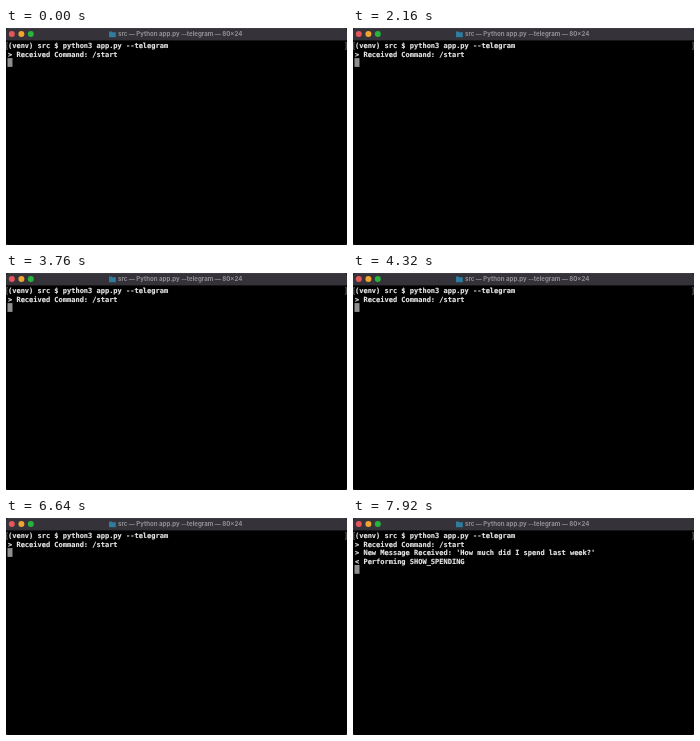
An HTML page that plays this animation: 341x217 px, repeating every 8000 ms.

```html
<!DOCTYPE html>
<html lang="en">
<head>
<meta charset="utf-8">
<title>Terminal</title>
<style>
  html, body { margin: 0; width: 100%; height: 100%; overflow: hidden; background: #2b2b2b; }
  svg { display: block; width: 100vw; height: 100vh; }
  .title { font: 700 6.1px Inter, sans-serif; fill: #929095; }
  .shell { font: bold 7px "DejaVu Sans Mono", monospace; fill: #e6e6e6; stroke: #e6e6e6; stroke-width: .15; }
</style>
</head>
<body>
<svg viewBox="0 0 341 217">
  <clipPath id="window"><rect width="341" height="217" rx="3"/></clipPath>
  <g clip-path="url(#window)">
    <rect width="341" height="217"/>
    <rect width="341" height="12.4" fill="#35323a"/>
    <rect width="341" height=".5" fill="#4a474e"/>
  </g>
  <circle cx="5.8" cy="6" r="3" fill="#e4565a"/>
  <circle cx="15.4" cy="6" r="3" fill="#efa530"/>
  <circle cx="24.8" cy="6" r="3" fill="#25b53c"/>
  <path d="M103 3.4h2.6l.8.8h3.4v5H103z" fill="#2f7c9e"/>
  <text class="title" x="112" y="8.3">src — Python app.py --telegram — 80×24</text>
  <path d="M1.8 14.4H.8v7h1M339.2 14.4h1v7h-1" fill="none" stroke="#777" stroke-width=".8"/>
  <g id="lines" class="shell"></g>
  <rect id="cursor" x="1.5" width="5" height="8.8" fill="#8e8e8e"/>
</svg>
<script>
  const LOOP = 8000, ROW = 8.45, TOP = 13.4;
  const script = [
    [0, "(venv) src $ python3 app.py --telegram"],
    [0, "> Received Command: /start"],
    [6720, "> New Message Received: 'How much did I spend last week?'"],
    [6720, "< Performing SHOW_SPENDING"]
  ];
  const lines = document.getElementById("lines");
  const cursor = document.getElementById("cursor");

  const rows = script.map(([start, text], i) => {
    const el = document.createElementNS("http://www.w3.org/2000/svg", "text");
    el.setAttribute("x", 2);
    el.setAttribute("y", TOP + ROW * i + 6.9);
    el.textContent = text;
    lines.append(el);
    return { start, el };
  });

  function draw(now) {
    const t = now % LOOP;
    let count = 0;
    for (const { start, el } of rows) {
      const shown = t >= start;
      el.setAttribute("visibility", shown ? "visible" : "hidden");
      count += shown;
    }
    cursor.setAttribute("y", TOP + ROW * count - .2);
    requestAnimationFrame(draw);
  }
  draw(performance.now());
</script>
</body>
</html>
```
